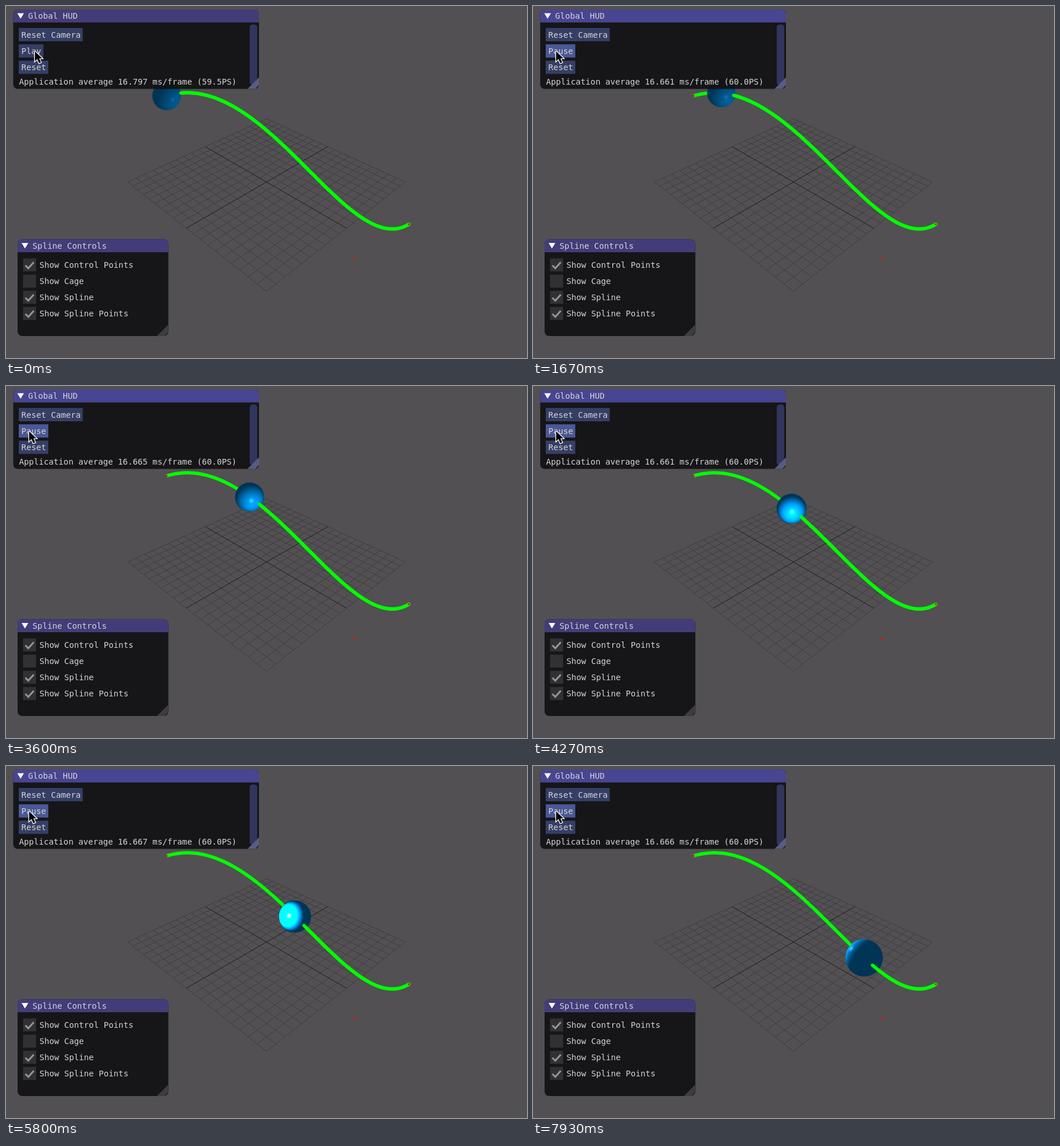
Animation of 900 by 609 pixels, one loop 8 s. Source, as an HTML page with a canvas:

```html
<!DOCTYPE html>
<html>
<head>
<meta charset="utf-8">
<style>
  html, body { margin: 0; width: 100%; height: 100%; overflow: hidden; background: #525052; }
  canvas { display: block; }
</style>
</head>
<body>
<canvas id="stage" width="900" height="609"></canvas>
<script>
const ctx = document.getElementById('stage').getContext('2d');
const LOOP = 8000, PLAY_TIME = 950;
const CX = 450, CY = 304.5, FOCAL = 735;
const BALL_RADIUS = 1.435;
const LIGHT = [0.2, 2.6, -34.8]; // camera space
const START = [277.5, 155.5], END = [696, 377.5];
const TITLE = '#423d79', TITLE_FOCUSED = '#484592';
const BUTTON = '#353f66', BUTTON_HOVER = '#4a5896';

const clamp = (v, lo = 0, hi = 1) => Math.min(hi, Math.max(lo, v));

// Cubic Bezier seen on screen.
function splinePoint(p) {
  const q = 1 - p, handles = [START, [446, 104], [590, 442], END];
  const weights = [q ** 3, 3 * q * q * p, 3 * q * p * p, p ** 3];
  return [0, 1].map(axis => weights.reduce((sum, w, i) => sum + w * handles[i][axis], 0));
}

// Position along the spline: slowest around 4.6 s after the start.
function ballProgress(t) {
  const s = Math.max(0, t - PLAY_TIME) / 1000;
  return 0.077 * s + 0.001033 * ((s - 4.6) ** 3 + 4.6 ** 3);
}

const ballSize = p => 24.3 + 29 * (p - 0.13) ** 2;

// Ground plane point seen from a camera at (25, 25, 25) looking at the origin.
function project(x, z) {
  const scale = FOCAL / (43.3 - (x + z) / Math.sqrt(3));
  return [CX + scale * (x - z) / Math.SQRT2, CY + scale * (x + z) / Math.sqrt(6)];
}

function polyline(points, color, width) {
  ctx.beginPath();
  points.forEach(p => ctx.lineTo(...p));
  ctx.strokeStyle = color;
  ctx.lineWidth = width;
  ctx.stroke();
}

function polygon(points, color) {
  ctx.beginPath();
  points.forEach(p => ctx.lineTo(...p));
  ctx.closePath();
  ctx.fillStyle = color;
  ctx.fill();
}

function rect(x, y, w, h, color, radius = 0) {
  ctx.beginPath();
  ctx.roundRect(x, y, w, h, radius);
  ctx.fillStyle = color;
  ctx.fill();
}

function text(str, x, y) {
  ctx.font = '14.2px "DejaVu Sans Mono", monospace';
  ctx.fillStyle = '#d4d4d4';
  ctx.fillText(str, x, y);
}

function drawGrid() {
  const cross = (i, color) => {
    polyline([project(i, -10), project(i, 10)], color, 1);
    polyline([project(-10, i), project(10, i)], color, 1);
  };
  for (let i = -10; i <= 10; i++) if (i) cross(i, '#3e3d3e');
  cross(0, '#1b1a1b');
}

function drawSpline(from) {
  const steps = 120;
  const points = Array.from({ length: steps + 1 },
    (_, i) => splinePoint(from + (1 - from) * i / steps));
  ctx.lineCap = from > 0 ? 'round' : 'butt';
  polyline(points, '#00ff00', 5.8);
  ctx.lineCap = 'butt';
}

function drawControlPoint([x, y]) {
  rect(x - 1.5, y - 1.5, 3, 3, '#ff0000');
}

const SIZE = 72;
const sprite = document.createElement('canvas');
sprite.width = sprite.height = SIZE;
const spriteCtx = sprite.getContext('2d');
const pixels = spriteCtx.createImageData(SIZE, SIZE);

// Sphere with a point light: ambient, diffuse and specular per pixel.
function drawBall([x, y], r) {
  const left = Math.floor(x - SIZE / 2), top = Math.floor(y - SIZE / 2);
  const depth = BALL_RADIUS * FOCAL / r;
  const center = [(x - CX) * depth / FOCAL, (CY - y) * depth / FOCAL, -depth];
  for (let j = 0; j < SIZE; j++) {
    for (let i = 0; i < SIZE; i++) {
      const dx = left + i + 0.5 - x, dy = top + j + 0.5 - y;
      const dist = Math.hypot(dx, dy), k = (j * SIZE + i) * 4;
      pixels.data[k + 3] = 255 * clamp(r - dist + 0.5);
      if (dist > r + 1) continue;
      const fit = Math.max(r, dist);
      const nx = dx / fit, ny = -dy / fit, nz = Math.sqrt(Math.max(0, 1 - nx * nx - ny * ny));
      const [lx, ly, lz] = [nx, ny, nz].map((n, axis) => LIGHT[axis] - center[axis] - n * BALL_RADIUS);
      const d = Math.hypot(lx, ly, lz), power = 9500 / (d * d + 4);
      const diffuse = Math.max(0, (nx * lx + ny * ly + nz * lz) / d);
      const half = (nx * lx + ny * ly + nz * (lz + d)) / Math.hypot(lx, ly, lz + d);
      const spec = diffuse > 0 ? 0.35 * power * Math.max(0, half) ** 90 : 0;
      const blue = 86 + power * diffuse;
      pixels.data[k] = spec;
      pixels.data[k + 1] = blue * 0.62 + spec;
      pixels.data[k + 2] = blue + spec;
    }
  }
  spriteCtx.putImageData(pixels, 0, 0);
  ctx.drawImage(sprite, left, top);
}

function drawWindow(x, y, w, h, title, titleColor) {
  rect(x, y, w, h, 'rgba(19,18,20,.94)', 8);
  rect(x, y, w, 22.5, titleColor, [8, 8, 0, 0]);
  polygon([[x + 7, y + 6.5], [x + 18.5, y + 6.5], [x + 12.7, y + 16]], '#ffffff');
  text(title, x + 25.8, y + 16);
}

function drawGrip(x, y, color) {
  polygon([[x, y - 20], [x, y - 7], [x - 6.5, y], [x - 20, y]], color);
}

function drawButton(label, y, color = BUTTON) {
  rect(22, y, label.length * 8.5 + 8.6, 23, color);
  text(label, 26.6, y + 16.5);
}

function drawHud(t) {
  const ms = 16.664 + 0.133 * clamp(1 - t / 1600) + 0.003 * Math.sin(t / 400);
  const playing = t >= PLAY_TIME;
  drawWindow(12.5, 6, 424.5, 137.5, 'Global HUD', t < 800 ? TITLE : TITLE_FOCUSED);
  drawButton('Reset Camera', 38);
  drawButton(playing ? 'Pause' : 'Play', 66.3, t < 70 ? BUTTON : BUTTON_HOVER);
  drawButton('Reset', 94.5);
  text(`Application average ${ms.toFixed(3)} ms/frame (${(1000 / ms).toFixed(1)}PS)`, 22.5, 135.5);
  rect(421, 32, 13, 105, '#30365c', 5);
  drawGrip(437, 143.5, '#585c80');
}

function drawSplineControls() {
  drawWindow(20, 403.5, 260.5, 167.5, 'Spline Controls', TITLE);
  ['Show Control Points', 'Show Cage', 'Show Spline', 'Show Spline Points'].forEach((label, i) => {
    const y = 436.7 + i * 28;
    rect(29.5, y, 22.5, 22.5, '#313133');
    if (label !== 'Show Cage') {
      polyline([[33.5, y + 12], [38.5, y + 17], [48, y + 6.5]], '#969696', 3);
    }
    text(label, 57.7, y + 16);
  });
  drawGrip(280.5, 571, '#3d3d3f');
}

function drawCursor(x, y) {
  const shape = [[0, 0], [0, 17], [4, 13.3], [7.2, 20.5], [10.4, 19.1], [7.3, 12.2], [12.5, 12], [0, 0]]
    .map(([px, py]) => [x + px, y + py]);
  polyline(shape, '#ffffff', 2.6);
  polygon(shape, '#000000');
}

function draw(t) {
  ctx.fillStyle = '#525052';
  ctx.fillRect(0, 0, 900, 609);
  drawGrid();
  drawSpline(0);
  drawControlPoint(START);

  const p = ballProgress(t);
  drawBall(splinePoint(p), ballSize(p));
  // The spline comes out of the sphere on the side facing the camera.
  drawSpline(p + 0.037 + 0.012 * clamp(1 - p / 0.25));
  drawControlPoint(END);
  drawControlPoint([602, 437.5]);

  drawHud(t);
  drawSplineControls();
  const move = clamp((t - 70) / 430);
  drawCursor(50 - 10 * move * (2 - move), 78.5);
}

function tick() {
  draw(performance.now() % LOOP);
  requestAnimationFrame(tick);
}
tick();
</script>
</body>
</html>
```
